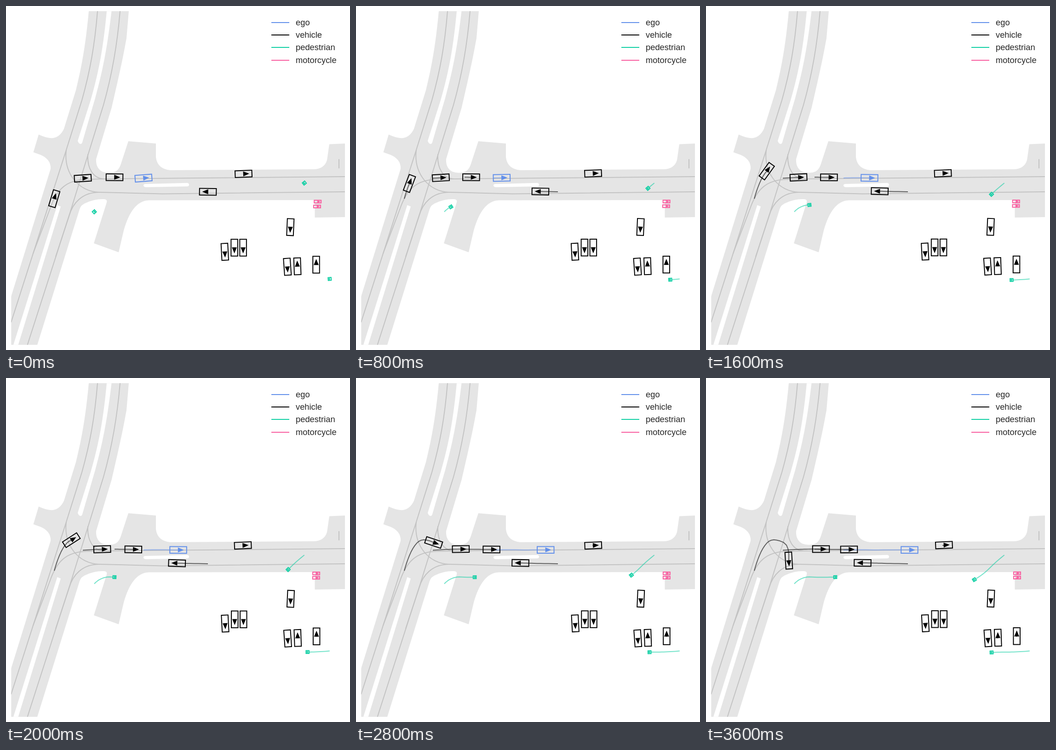
Write an HTML page with a canvas that moves like this. It is 748x748 px and loops after 3.8 s.

```html
<!DOCTYPE html>
<html lang="en">
<head>
<meta charset="utf-8">
<title>Traffic scene</title>
<style>
  html, body { margin: 0; width: 100%; height: 100%; overflow: hidden; background: #fff; }
  svg, canvas { position: absolute; left: 0; top: 0; width: 748px; height: 748px; }
  text { font: 18.33px "Liberation Sans", Arial, sans-serif; fill: #262626; }
  .lane { fill: none; stroke: #c3c3c3; stroke-width: 2; }
</style>
</head>
<body>
<svg viewBox="0 0 748 748">
  <clipPath id="plot"><rect x="11.3" y="11.3" width="725.7" height="725.5"/></clipPath>
  <g clip-path="url(#plot)">
    <path fill="#e5e5e5" d="M180 11 C174 75 167 122 152 183 L126 267 Q118 284 103 287 Q92 289 71 279.5
      L59.5 318 L76 324 Q98 334 97 354 L11 632 V737 H68 L160 442 Q163 432 174 428 Q194 419 212 420 Q221 420 219 427
      L191 516 L245 535.5 L256 488 Q274 424 310 422.5 L671.5 422 V460 L737 459 V299 L703 300.5 L698 335
      Q692 355 668 355 L357 357 Q329 354 326 329 V299 L266 294 L249 346 Q244 360 232 362 Q219 364 209 360
      Q195 352 196 333 L230 220 C245 155 254 115 262 70 L267 11 Z"/>
    <g fill="#fff">
      <path d="M219 11 C212 86 203 140 184 205 L156 293 Q158 300 162 300 Q165 300 166 296 L194 200 C213 131 221 82 229.5 11 Z"/>
      <path d="M16 737 L111.5 433 L119 436 L26.5 737 Z"/>
      <path d="M303 387 L394 384.8 Q398 385 398 389 Q398 392 394 392.3 L304 394 Q299 393.5 299 390 Q299 387 303 387 Z"/>
    </g>
    <g class="lane">
      <path d="M199 11 C193 85 183 141 165 205 L131 313 L11 688"/>
      <path d="M248 11 C242 85 231 148 212 215 L139 450 L46.5 737"/>
      <path d="M131 313 C125 364 158 404 203 405 L340 408.5 L737 404"/>
      <path d="M178 322 C176 354 190 375 213 376 L737 371"/>
      <path d="M59 538 L96 440 C110 400 130 378 175 377 L213 376"/>
      <path d="M203 405 C166 405 145 428 137 457 L108 545"/>
      <path d="M724 333 V353"/>
    </g>
  </g>
  <g id="legend"></g>
</svg>
<canvas id="view" width="748" height="748"></canvas>
<script>
const STEP = 200, STEPS = 19, HEADING_LAG = 2;
const kinds = {
  ego: { color: '#6390ea', length: 36.5, width: 14.5 },
  vehicle: { color: '#000', length: 36.5, width: 14.5 },
  pedestrian: { color: '#10cfa4', length: 6.6, width: 6.2 },
  motorcycle: { color: '#f95d9f', length: 15, width: 5.8 },
};
const ctx = document.getElementById('view').getContext('2d');
const actors = [];

document.getElementById('legend').innerHTML = Object.entries(kinds).map(([name, { color }], i) => {
  const y = Math.round(36 + 27.2 * i);
  return `<path d="M577 ${y}H616" stroke="${color}" stroke-width="2"/><text x="630" y="${y + 6}">${name}</text>`;
}).join('');

// Smooth curve through points evenly spaced in time, u from 0 to 1.
function along(points, u) {
  const last = points.length - 1;
  const i = Math.min(Math.floor(u * last), last - 1), t = u * last - i;
  return [0, 1].map(axis => {
    const at = k => points[k][axis];
    const inner = k => (at(k + 1) - at(k - 1)) / 2;
    const a = at(i), d = at(i + 1) - a;
    let start = i > 0 ? inner(i) : d;
    const end = i + 1 < last ? inner(i + 1) : 2 * d - start;
    if (i === 0) start = 2 * d - end;
    return a + t * (start + t * (3 * d - 2 * start - end + t * (start + end - 2 * d)));
  });
}

// Without a fixed heading, an actor faces along its latest steps.
function add(kind, points, heading) {
  const trail = Array.from({ length: STEPS }, (_, s) => along(points, s / (STEPS - 1)));
  const headingAt = step => {
    const s = Math.max(step, HEADING_LAG);
    const [x0, y0] = trail[s - HEADING_LAG], [x1, y1] = trail[s];
    return Math.atan2(y1 - y0, x1 - x0);
  };
  actors.push({ ...kinds[kind], trail, headingAt: heading === undefined ? headingAt : () => heading * Math.PI / 180 });
}

// Parked cars only show a slight tracking drift.
function park(x, y, heading) {
  add('vehicle', [[x, y], [x + 1.2, y - 1.2]], heading);
}

add('ego', [[299, 374.2], [309, 373.7], [336.5, 373.5], [365, 373.9], [393.5, 373.8], [421, 373.7], [442.5, 373.8]]);

add('vehicle', [[105, 419], [113, 394], [123.5, 371], [137, 355], [153.5, 352.5], [175, 363.5], [180, 397]]);
add('vehicle', [[167, 374.5], [193, 373], [218, 372.2], [250, 372]]);
add('vehicle', [[236, 372.3], [258.5, 372.5], [286, 372.8], [311, 372.8]]);
add('vehicle', [[439, 404], [387, 403], [365.5, 402.4], [340.5, 402]]);
add('vehicle', [[516.5, 365], [515.3, 363.8], [515.3, 364.2], [517.5, 363.3]], -2.5);

park(618.3, 480.8, 92.4);
park(475.8, 534.5, 87);
park(496.6, 525.5, 90);
park(515.6, 525.5, 90);
park(611.8, 567, 86);
park(633.6, 566, -92);
park(674.5, 562.5, -90);

add('pedestrian', [[192, 447.5], [215, 433.7], [247, 433.3], [281, 433]]);
add('pedestrian', [[648.7, 385], [627.8, 402.7], [606.2, 423], [583.5, 438.5]]);
add('pedestrian', [[703.8, 593.5], [673.7, 595.6], [647, 596], [621, 596.8]]);

add('motorcycle', [[677.7, 425.3], [674.5, 425], [675, 424.9], [676.5, 424.6]], 0);
add('motorcycle', [[676.5, 436], [674, 435], [674.9, 434.2], [676.5, 434]], 0);

function draw({ color, length, width, trail, headingAt }, step) {
  ctx.save();
  ctx.strokeStyle = ctx.fillStyle = color;
  ctx.lineWidth = 2;

  ctx.globalAlpha = 0.58;
  ctx.lineJoin = 'round';
  ctx.beginPath();
  trail.slice(0, step + 1).forEach(([x, y]) => ctx.lineTo(x, y));
  ctx.stroke();

  ctx.globalAlpha = 1;
  ctx.lineJoin = 'miter';
  ctx.translate(...trail[step]);
  ctx.rotate(headingAt(step));
  ctx.strokeRect(-length / 2, -width / 2, length, width);

  ctx.lineWidth = 1.4;
  ctx.beginPath();
  ctx.moveTo(0, -width * 0.3);
  ctx.lineTo(length * 0.29, 0);
  ctx.lineTo(0, width * 0.3);
  ctx.closePath();
  ctx.fill();
  ctx.stroke();
  ctx.restore();
}

let shown = -1;
function frame() {
  const step = Math.floor(performance.now() / STEP) % STEPS;
  if (step !== shown) {
    shown = step;
    ctx.clearRect(0, 0, 748, 748);
    for (const actor of actors) draw(actor, step);
  }
  requestAnimationFrame(frame);
}
frame();
</script>
</body>
</html>
```
